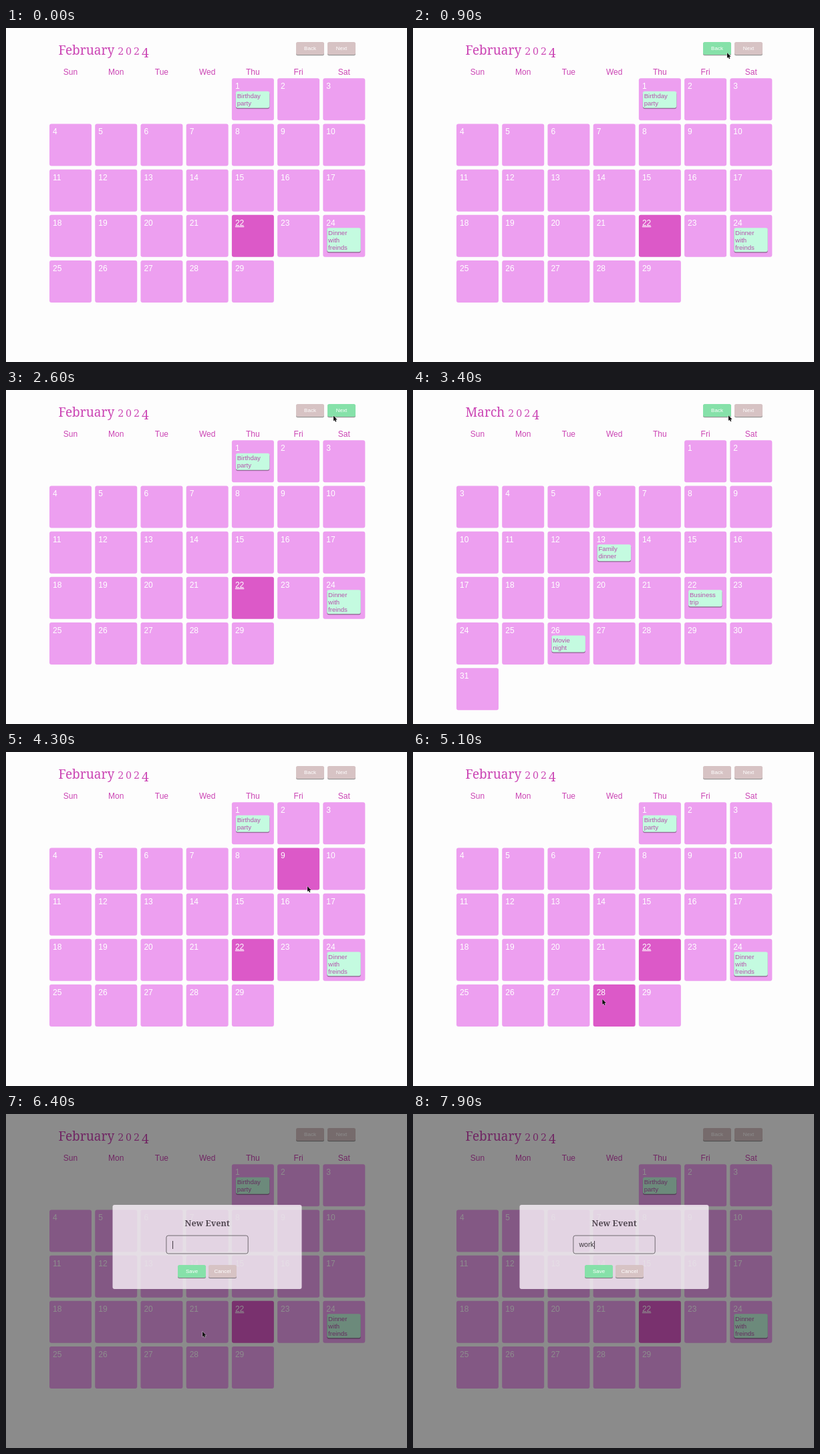
These frames come from a looping animation (600x500 px, 8000 ms). An HTML page:

```html
<!DOCTYPE html>
<html lang="en">
<head>
<meta charset="utf-8">
<title>Calendar</title>
<style>
  html, body { margin: 0; width: 100%; height: 100%; overflow: hidden; background: #fdfdfd; }
  svg { display: block; width: 600px; height: 500px; font-family: "Liberation Sans", Arial, sans-serif; }
  .serif { font-family: "Noto Serif", serif; }
  .old { font-family: "DejaVu Serif", serif; font-size: 14.2px; letter-spacing: 2.9px; }
  .tall { letter-spacing: 1.2px; }
</style>
</head>
<body>
<svg id="stage" viewBox="0 0 600 500"></svg>
<script>
const LOOP = 8000, STEP = 100, PITCH = 68.22, CELL = 63;
const PINK = '#ed9ff0', MAGENTA = '#dc59c8', INK = '#cb45b4', MINT = '#c4fbe0', GREEN = '#86e1a9', BEIGE = '#d7c3c4';
const WEEKDAYS = ['Sun', 'Mon', 'Tue', 'Wed', 'Thu', 'Fri', 'Sat'];

const months = {
  dec: { name: 'December', year: 2023, index: 11, events: {
    7: ['Hanging', 'out with', 'friends'], 10: ['Study', 'group', 'meeting'], 26: ['Grocery', 'shopping'] } },
  jan: { name: 'January', year: 2024, index: 0, events: {} },
  feb: { name: 'February', year: 2024, index: 1, today: 22, events: {
    1: ['Birthday', 'party'], 24: ['Dinner', 'with', 'freinds'] } },
  mar: { name: 'March', year: 2024, index: 2, events: {
    13: ['Family', 'dinner'], 22: ['Business', 'trip'], 26: ['Movie', 'night'] } },
};

// Each list holds [start time, value].
const monthAt = [[0, 'feb'], [1200, 'jan'], [1600, 'dec'], [2200, 'jan'], [2500, 'feb'], [2900, 'mar'], [3500, 'feb']];
const typedAt = [[0, ''], [7500, 'w'], [7800, 'wor'], [7900, 'work']];
const OPEN = 6300, CURSOR_FROM = 200, CURSOR_TO = 6600;
const pointer = [
  [200, 552, 54], [300, 552, 54], [900, 470, 37], [1600, 470, 37], [2000, 490, 38.5], [3100, 490, 38.5],
  [3400, 472, 38], [3800, 472, 38], [4000, 486, 92], [4100, 480, 150], [4300, 451, 201], [4700, 420, 272],
  [4900, 362, 366], [5200, 244, 372], [5600, 291, 391], [6300, 291, 391], [6600, 300, 195],
];

const latest = (list, t) => list.filter(([start]) => start <= t).pop()[1];
const inside = (p, x, y, w, h) => p && p.x >= x && p.x < x + w && p.y >= y && p.y < y + h;

function pointerAt(t) {
  if (t < CURSOR_FROM || t >= CURSOR_TO) return null;
  const i = pointer.findIndex(([end]) => end > t);
  const [t0, x0, y0] = pointer[i - 1], [t1, x1, y1] = pointer[i];
  const k = (t - t0) / (t1 - t0);
  return { x: x0 + (x1 - x0) * k, y: y0 + (y1 - y0) * k };
}

const rect = (x, y, w, h, fill, r = 3, extra = '') =>
  `<rect x="${x}" y="${y}" width="${w}" height="${h}" rx="${r}" fill="${fill}" ${extra}/>`;
const text = (x, y, size, fill, content, extra = '') =>
  `<text x="${x}" y="${y}" font-size="${size}" fill="${fill}" ${extra}>${content}</text>`;
const centered = 'text-anchor="middle"';

function raised(x, y, w, h, fill, r) {
  return rect(x, y + 1.6, w, h, '#0002', r) + rect(x, y + 1, w, h, '#0005', r) + rect(x, y, w, h, fill, r);
}

function button(x, y, label, fill) {
  return raised(x, y, 42, 19, fill, 2.5) + text(x + 21, y + 12.2, 8, '#fff', label, centered);
}

// Old-style figures: 0 and 2 at x-height, 3 and 4 hanging below the baseline.
function title({ name, year }) {
  let shift = 0;
  const figures = [...String(year)].map(d => {
    const hang = d > 2 ? 4 : 0, dy = hang - shift;
    shift = hang;
    return `<tspan class="${hang ? 'tall' : 'old'}" dy="${dy}">${d}</tspan>`;
  }).join('');
  return text(78.5, 39.5, 19, INK, `${name} ${figures}`, 'class="serif"');
}

function eventCard(x, y, lines) {
  const card = raised(x + 6, y + 19.5, 50.5, 3 + lines.length * 11, MINT, 3);
  return card + lines.map((line, i) => text(x + 7.8, y + 29.7 + i * 11, 9.6, '#b653ac', line)).join('');
}

function dayCell(month, day, slot, mouse) {
  const x = 65 + (slot % 7) * PITCH, y = 75.2 + Math.floor(slot / 7) * PITCH;
  const isToday = day === month.today;
  const active = isToday || inside(mouse, x, y, CELL, CELL);
  const lines = month.events[day];
  return rect(x, y, CELL, CELL, active ? MAGENTA : PINK) +
    text(x + 5, y + 16, 12, '#fff', day, isToday ? 'text-decoration="underline"' : '') +
    (lines ? eventCard(x, y, lines) : '');
}

function calendar(month, mouse) {
  const first = new Date(month.year, month.index, 1).getDay();
  const count = new Date(month.year, month.index + 1, 0).getDate();
  const nav = [['Back', 434], ['Next', 481]].map(([label, x]) =>
    button(x, 21, label, inside(mouse, x, 21, 42, 20) ? GREEN : BEIGE)).join('');
  const heads = WEEKDAYS.map((name, i) => text(96.5 + i * PITCH, 70, 12, INK, name, centered)).join('');
  let days = '';
  for (let d = 1; d <= count; d++) days += dayCell(month, d, first + d - 1, mouse);
  return title(month) + nav + heads + days;
}

function dialog(t) {
  const typed = latest(typedAt, t);
  const caretOn = typed || Math.floor((t - OPEN) / 500) % 2 === 0;
  const caret = caretOn ? '<tspan dx="-0.6" font-size="12" font-weight="100">|</tspan>' : '';
  return rect(0, 0, 600, 500, '#000', 0, 'opacity=".45"') +
    rect(159.5, 136, 283, 126, '#fcf3fc', 3, 'opacity=".8"') +
    text(301.2, 168, 12.5, '#554b55', 'New Event', `${centered} class="serif" font-weight="700"`) +
    rect(239.9, 182, 122.3, 27, 'none', 3, 'stroke="#716a71"') +
    text(248.5, 199, 10.5, '#3d373d', typed + caret) +
    button(257, 226, 'Save', GREEN) + button(303, 226, 'Cancel', BEIGE);
}

const arrow = ({ x, y }) =>
  `<path transform="translate(${x} ${y})" d="M0 0V8L1.8 6.4L3 9.2L4.4 8.6L3.2 5.9H5.6Z"
    fill="#111" stroke="#fff" stroke-width=".7" paint-order="stroke"/>`;

function scene(t) {
  const mouse = pointerAt(t), open = t >= OPEN;
  return rect(0, 0, 600, 500, '#fdfdfd', 0) +
    calendar(months[latest(monthAt, t)], open ? null : mouse) +
    (open ? dialog(t) : '') + (mouse ? arrow(mouse) : '');
}

const stage = document.getElementById('stage');
const begin = performance.now();
let shown = -1;

function update() {
  const t = Math.floor(((performance.now() - begin) % LOOP) / STEP) * STEP;
  if (t !== shown) {
    shown = t;
    stage.innerHTML = scene(t);
  }
  requestAnimationFrame(update);
}
update();
</script>
</body>
</html>
```
